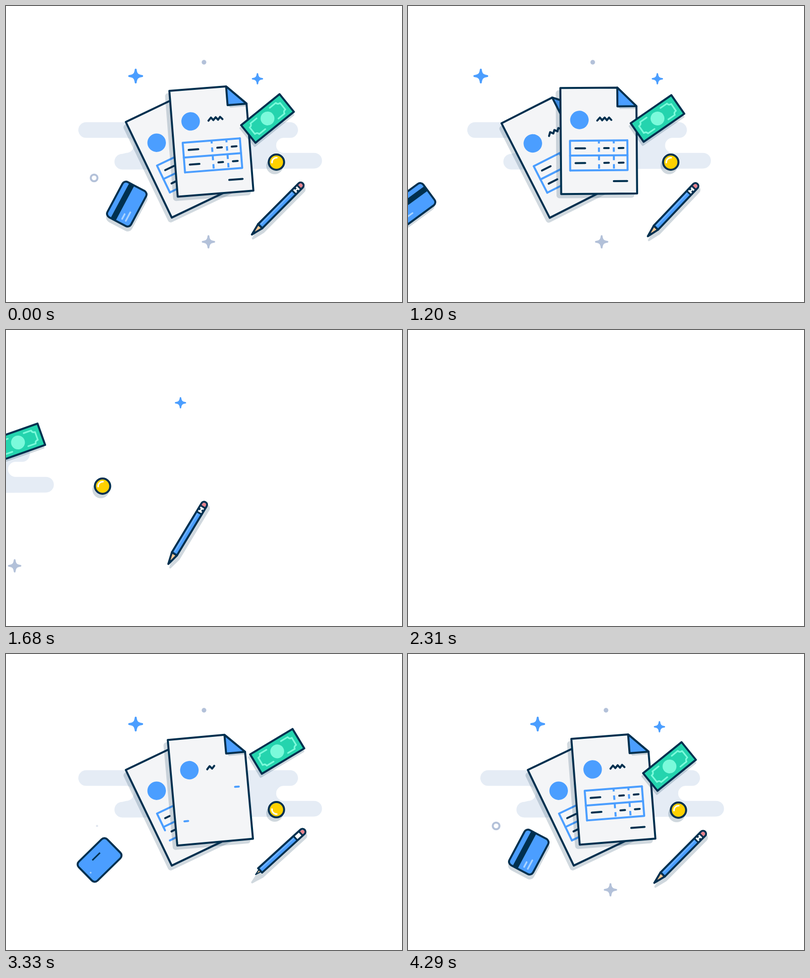
An HTML page that plays this animation: 800 px wide and 600 px high, repeating every 4.32 s.

```html
<!DOCTYPE html>
<html lang="en">
<head>
<meta charset="utf-8">
<title>Paperwork</title>
<style>
  html, body { margin: 0; width: 100%; height: 100%; overflow: hidden; background: #fff; }
  svg { display: block; width: 800px; height: 600px; }
  .ink { stroke: #00304f; }
  .blue { stroke: #4b9eff; }
  .line { fill: none; stroke-width: 4; stroke-linecap: round; stroke-linejoin: round; }
  .shape { stroke: #00304f; stroke-width: 4; stroke-linejoin: round; }
  .shade { fill: #00304f; stroke: #00304f; stroke-width: 4; stroke-linejoin: round; }
  .star { stroke-width: 4; stroke-linejoin: round; }
  .sky { fill: #4b9eff; stroke: #4b9eff; }
  .mist { fill: #b3c1d9; stroke: #b3c1d9; }
</style>
</head>
<body>
<svg viewBox="0 0 800 600">
  <defs>
    <path id="spark" class="star" d="M0-13C1-4 4-1 13 0C4 1 1 4 0 13C-1 4-4 1-13 0C-4-1-1-4 0-13Z"/>
  </defs>
  <g id="cloud"><path fill="#e5ecf5"/></g>
  <g id="dot"><circle r="4.7" fill="#b3c1d9" data-pop="2840 200"/></g>
  <g id="starA"><g class="sky" data-pop="3000 250"><use href="#spark"/></g></g>
  <g id="starB"><g class="sky" data-pop="3400 250"><use href="#spark" transform="scale(.76)"/></g></g>
  <g id="starC"><g class="mist" data-pop="3780 260"><use href="#spark" transform="scale(.9)"/></g></g>
  <g id="ring"><circle r="6.8" fill="none" stroke="#b3c1d9" stroke-width="4" data-pop="3250 220"/></g>
  <g id="back"></g>
  <g id="front"></g>

  <g id="bill">
    <g opacity=".18"><rect class="shade" x="-55" y="-19" width="100" height="46" data-fade="2920 200"/></g>
    <path class="shape" fill="#24d4ae" d="M50-23V23H-50V-23Z" data-draw="2740 240"/>
    <circle r="14" fill="#7bfadb" data-pop="2900 220"/>
    <g fill="none" stroke="#7bfadb" stroke-width="3.2" stroke-linecap="round" stroke-linejoin="round">
      <path d="M17-14H33Q33.500-8.500 39.500-8.500V8.500Q33.500 8.500 33 14H17" data-draw="2920 300"/>
      <path d="M-17 14H-33Q-33.500 8.500-39.500 8.500V-8.500Q-33.500-8.500-33-14H-17" data-draw="2920 300"/>
    </g>
  </g>

  <g id="coin">
    <g opacity=".18"><circle class="shade" cx="-3.500" cy="7.500" r="15" data-fade="3020 200"/></g>
    <g data-pop="2900 240">
      <circle class="shape" r="15.500" fill="#ffd100"/>
      <path id="shine" class="line" stroke="#fff" style="stroke-width:3" d="M-9 1A9.500 9.500 0 0 1 1-9"/>
    </g>
  </g>

  <g id="pencil">
    <g opacity=".18" transform="translate(-4.200 7)">
      <path class="shade" d="M-74 0L-50-6H66A6 6 0 0 1 66 6H-50Z" data-fade="3080 200"/>
    </g>
    <g transform="translate(-50 0)">
      <g data-pop="3230 200">
        <path class="shape" fill="#fdc893" d="M0-6L-24 0L0 6Z"/>
        <path fill="#00304f" d="M-15-3L-25 0L-15 3Z"/>
      </g>
    </g>
    <path class="shape" fill="#4b9eff" d="M-50-6H66A6 6 0 0 1 66 6H-50Z" data-draw="2950 240"/>
    <g data-fade="3120 120">
      <path stroke="#78b8ff" stroke-width="2" d="M-46-2H44"/>
      <path fill="#e8828a" d="M62-4H66A4 4 0 0 1 66 4H62Z"/>
      <path fill="#00304f" d="M45-6H63V6H45Z"/>
      <path fill="#fff" d="M48.500-4H59.500V4H48.500Z"/>
    </g>
    <path class="ink" stroke-width="4" d="M54-5V-1.500" data-draw="3480 200"/>
    <path class="ink" stroke-width="4" d="M54 5V1.500" data-draw="3480 200"/>
  </g>

  <g id="card">
    <g opacity=".18"><rect class="shade" x="-23" y="-33.300" width="54" height="80.600" rx="8" data-fade="3400 200"/></g>
    <rect class="shape" fill="#4b9eff" x="-27" y="-40.300" width="54" height="80.600" rx="8" data-draw="3080 220"/>
    <g transform="translate(-9.800 0)"><path class="ink" stroke-width="11.500" d="M0-41V41" data-pop="3250 200"/></g>
    <g stroke="#a8d3ff" style="stroke-width:3.400" fill="none" stroke-linecap="round">
      <path d="M5.800 31V20" data-draw="3300 250"/>
      <path d="M14.200 31V11.500" data-draw="3340 250"/>
    </g>
  </g>
</svg>

<script>
const LOOP = 4320, RESET = 2200;
const $ = id => document.getElementById(id);
const clamp = x => Math.min(1, Math.max(0, x));
const inOut = x => (x = clamp(x), x < .5 ? 4 * x ** 3 : 1 - 4 * (1 - x) ** 3);
let t = 0;

// Everything counts as fully grown until the stage has emptied.
const grow = (start, span) => t < RESET ? 1 : inOut((t - start) / span);

function doc(base) {
  const at = (s, d) => `"${base + s} ${d}"`;
  const stroke = (kind, d, s, span) => `<path class="line ${kind}" d="${d}" data-draw=${at(s, span)} />`;
  const column = x => `<line class="line blue" style="stroke-linecap:butt" x1="${x}" x2="${x}" y1="107"
    stroke-dasharray="9 8" stroke-dashoffset="3" data-len=${at(700, 400)} />`;
  const row = y => [[29.5, 49], [87.5, 96.8], [116.8, 126.5]]
    .map(([a, b], i) => stroke('ink', `M${a} ${y}H${b}`, 820 + i * 100, 400)).join('');
  return `<g transform="translate(-76.7 -107.5)">
    <g opacity=".18"><path class="line ink" style="stroke-width:12" d="M-3.5 10.5V217.5H142" data-draw=${at(230, 240)} /></g>
    <path class="shape" fill="#f4f5f7" d="M0 215V0H115L153.4 38V215Z" data-draw=${at(0, 270)} />
    <path fill="#00304f" opacity=".18" d="M116 38H152V43.500H120Z" data-fade=${at(180, 180)} />
    <path class="shape" fill="#4b9eff" d="M115 0V38H153.4Z" data-draw=${at(100, 220)} />
    <g transform="translate(38 65)"><circle r="18.7" fill="#4b9eff" data-pop=${at(355, 200)} /></g>
    ${stroke('ink', 'M74 66.5L79.500 60.500L84 66L89 60.500L93.500 66L98 60.500L102.500 65.500', 560, 240)}
    ${column(77)}${column(107)}
    ${stroke('blue', 'M18.600 137.200H134.500', 690, 500)}
    ${stroke('blue', 'M18.600 167.300H134.500V107', 517, 739)}
    ${stroke('blue', 'M134.500 107H18.600V167.300', 517, 739)}
    ${row(122.5)}${row(152.3)}
    ${stroke('ink', 'M106.500 189.500H133.500', 900, 400)}
  </g>`;
}
$('back').innerHTML = doc(2310);
$('front').innerHTML = doc(2650);

// Pose, exit start, exit spin [degrees, power], entry offset [dx, dy, turn, start]
const parts = [
  { id: 'cloud', x: 0, y: 0, out: 892 },
  { id: 'dot', x: 400, y: 114, out: 890 },
  { id: 'starA', x: 262, y: 142, out: 667 },
  { id: 'starB', x: 508, y: 147.5, out: 1098 },
  { id: 'starC', x: 409, y: 478, out: 946 },
  { id: 'ring', x: 178, y: 348.5, out: 553, from: [6, 0, 0, 3200] },
  { id: 'back', x: 357.6, y: 298.8, r: -25.6, out: 793, spin: [-5.6, 1.6], from: [15, -17.5, 6.6, 2310] },
  { id: 'front', x: 414.9, y: 273.2, r: -4.5, out: 876, spin: [24.4, 1.6], from: [-53, 30, -17, 2690] },
  { id: 'bill', x: 528.3, y: 228, r: -39, out: 904, spin: [29, 1.58], from: [20.5, -32, 8.4, 3150] },
  { id: 'coin', x: 546.3, y: 316.5, out: 964, from: [0, -2, 0, 2922] },
  { id: 'pencil', x: 548.8, y: 410.7, r: -45.3, out: 728, spin: [-16, 3.3], pull: [2, .00475], from: [1.5, -6, 3, 3150] },
  { id: 'card', x: 244, y: 401.5, r: 28, out: 551, spin: [51, 1.6], from: [-57.5, 16.7, 18.3, 3150] }
];

function pose({ id, x, y, r = 0, out, spin = [0, 1], pull = [5, .00595], from }) {
  if (t < RESET) {
    const age = Math.max(0, t - out);
    x -= pull[0] * (Math.exp(pull[1] * age) - 1);
    r += spin[0] * (age / 1000) ** spin[1];
  } else if (from) {
    const left = 1 - grow(from[3], 815);
    x += from[0] * left;
    y += from[1] * left;
    r += from[2] * left;
  }
  if (id === 'pencil') {
    const drift = Math.sin(Math.PI * clamp(t / 1800)) ** 2;
    const sway = Math.sin(Math.PI * clamp((t - 3330) / 1000));
    x += 4.5 * drift + 7 * sway;
    y += 3 * drift + 5 * sway;
  }
  $(id).setAttribute('transform', `translate(${x} ${y}) rotate(${r})`);
}

const show = (el, p) => el.setAttribute('visibility', p > .001 ? 'visible' : 'hidden');
const effects = {
  draw(el, p) {
    show(el, p);
    el.style.strokeDasharray = p < 1 ? `${p} 2` : 'none';
    el.style.fillOpacity = clamp(2 * p - 1);
  },
  pop(el, p) {
    show(el, p);
    el.setAttribute('transform', `scale(${p})`);
  },
  fade(el, p) { el.style.opacity = el.hasAttribute('opacity') ? p * el.getAttribute('opacity') : p; },
  len(el, p) {
    show(el, p);
    el.setAttribute('y2', 107 + 60.3 * p);
  }
};
const grown = Object.keys(effects).flatMap(kind =>
  [...document.querySelectorAll(`[data-${kind}]`)].map(el => {
    if (kind === 'draw') el.setAttribute('pathLength', 1);
    return { el, apply: effects[kind], time: el.dataset[kind].split(' ').map(Number) };
  }));

const cloud = $('cloud').firstElementChild;
function spread() {
  const s = grow(2545, 420), at = x => 392 + (x - 392) * s;
  show(cloud, s);
  cloud.setAttribute('d', `M${at(162)} 235.5H${at(574)}a15.9 15.9 0 0 1 0 31.8H${at(561)}
    a15.2 15.2 0 0 0 0 30.4H${at(622.5)}a15.9 15.9 0 0 1 0 31.8L${at(235)} 331.5
    a15.9 15.9 0 0 1 0-31.8L${at(243)} 297.7a15.2 15.2 0 0 0 0-30.4H${at(162)}a15.9 15.9 0 0 1 0-31.8Z`);
}

const begin = performance.now();
function frame() {
  t = (performance.now() - begin) % LOOP;
  parts.forEach(pose);
  grown.forEach(({ el, apply, time }) => apply(el, grow(...time)));
  spread();
  $('shine').setAttribute('transform', `rotate(${-180 * (1 - grow(2922, 815))})`);
  requestAnimationFrame(frame);
}
frame();
</script>
</body>
</html>
```
